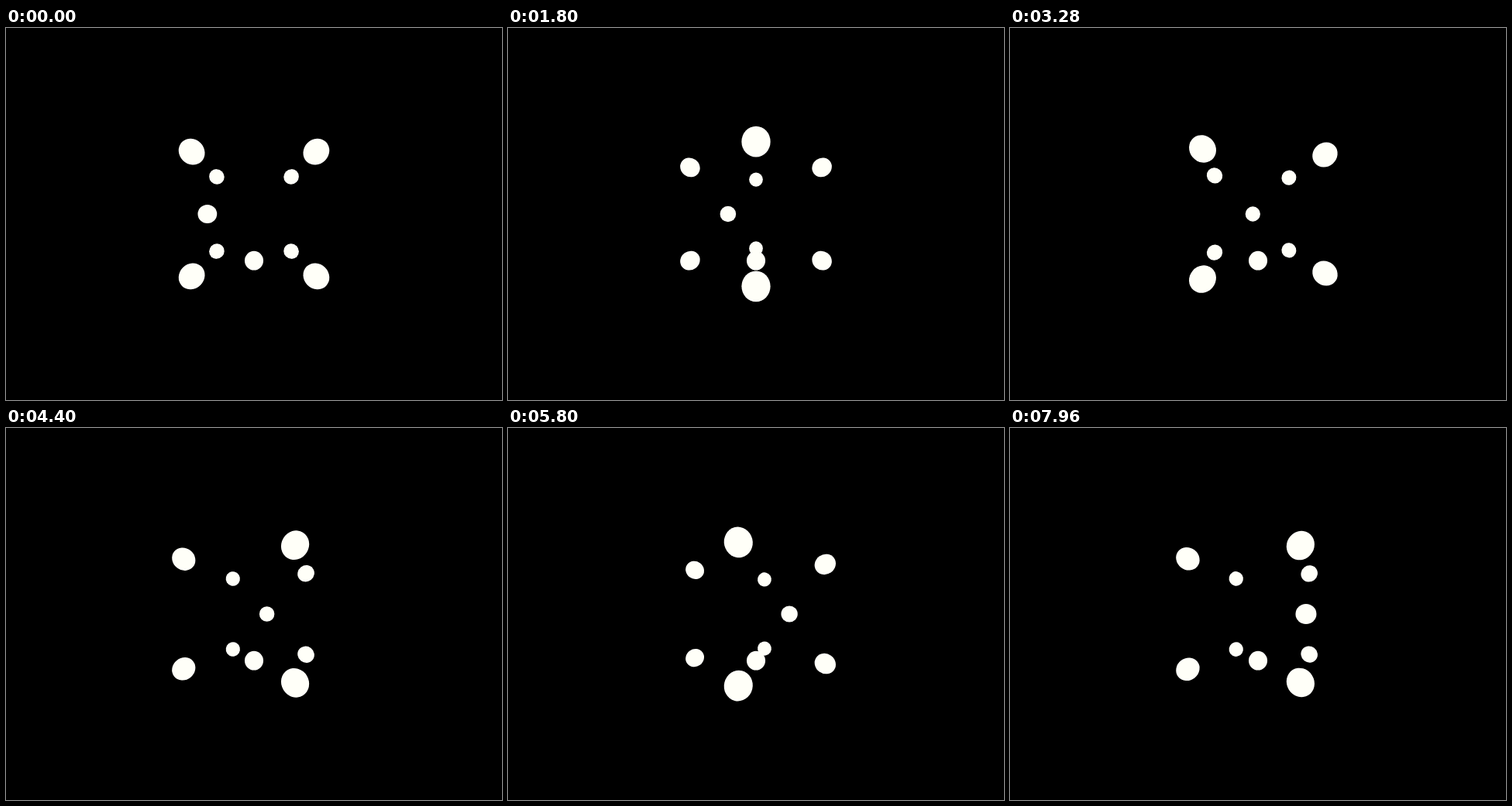
An HTML page with a canvas that plays this animation: 640x480 px, repeating every 8 s.

```html
<!DOCTYPE html>
<html lang="en">
<head>
<meta charset="utf-8">
<title>Rotating spheres</title>
<style>
  html, body { margin: 0; width: 100%; height: 100%; overflow: hidden; background: #000; }
  canvas { display: block; }
</style>
</head>
<body>
<canvas id="stage" width="640" height="480"></canvas>
<script>
const ctx = document.getElementById('stage').getContext('2d');
const FOCAL = 240, CAMERA = 4, RADIUS = 0.2;
const STEP = 40, LOOP = 8000;

// Cube corners, one sphere on the left and one below; z points at the viewer.
const spheres = [[-1, 0, 0], [0, 1, 0]];
for (const x of [-1, 1])
  for (const y of [-1, 1])
    for (const z of [-1, 1]) spheres.push([x, y, z]);

// Exact perspective outline of a sphere: an ellipse stretched away from the centre.
function drawSphere(x, y, depth) {
  const m = depth * depth - RADIUS * RADIUS;
  const k = m + x * x + y * y;
  const shift = FOCAL * depth / m;
  const major = FOCAL * RADIUS * Math.sqrt(k) / m;
  const minor = FOCAL * RADIUS / Math.sqrt(m);
  ctx.beginPath();
  ctx.ellipse(320 + x * shift, 240 + y * shift, major, minor, Math.atan2(y, x), 0, 2 * Math.PI);
  ctx.fill();
}

function draw(time) {
  // One degree per step around the vertical axis.
  const angle = Math.floor((time % LOOP) / STEP) * Math.PI / 180;
  const c = Math.cos(angle), s = Math.sin(angle);
  ctx.fillStyle = '#000';
  ctx.fillRect(0, 0, 640, 480);
  ctx.fillStyle = '#fffff8';
  for (const [x, y, z] of spheres) drawSphere(x * c - z * s, y, CAMERA - z * c - x * s);
}

const start = performance.now();
function tick() {
  draw(performance.now() - start);
  requestAnimationFrame(tick);
}
tick();
</script>
</body>
</html>
```
